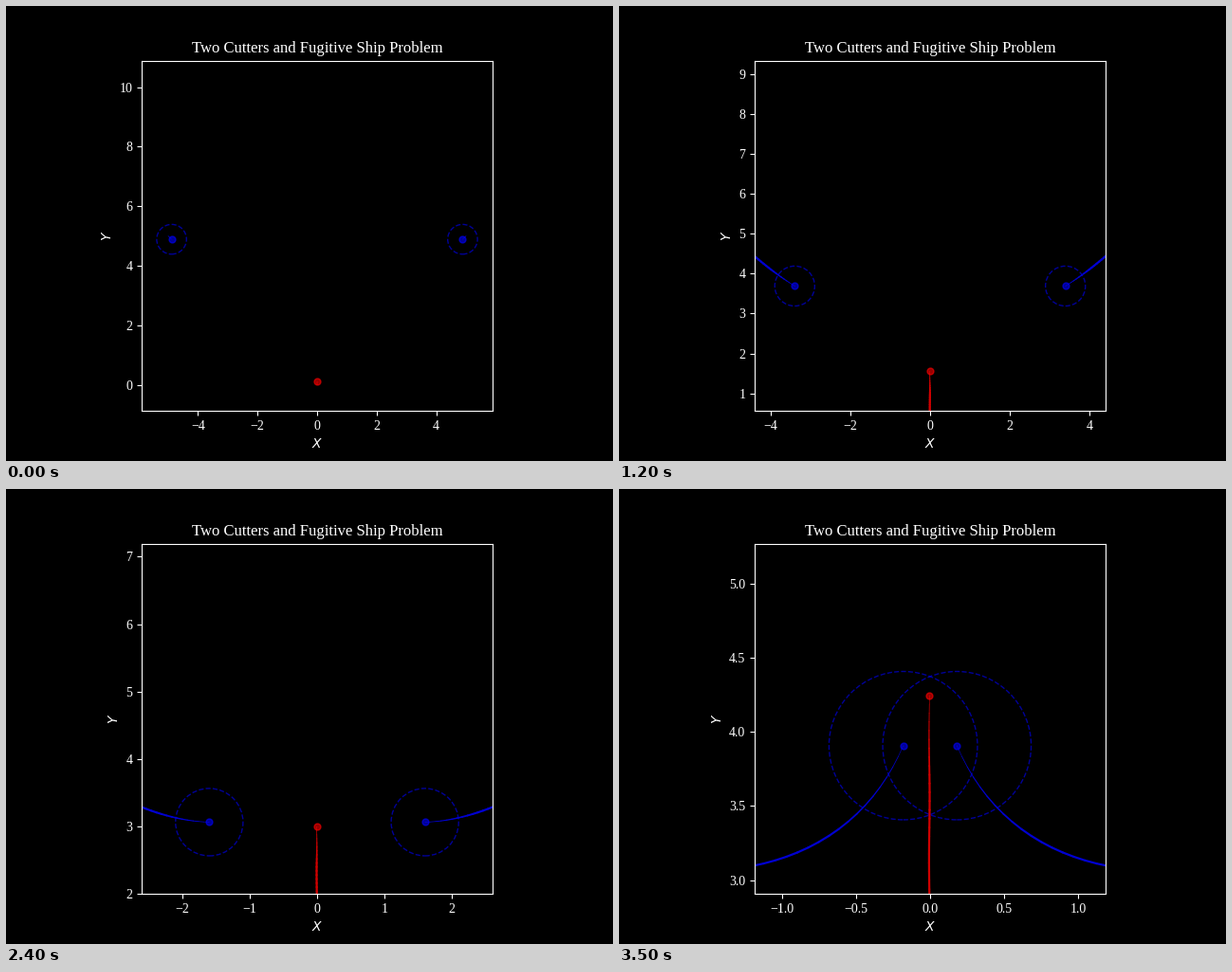
Recreate the animation shown at these times as a matplotlib script. Size 640 by 480 pixels, loop 8000 ms.

```python
import numpy as np
import matplotlib.pyplot as plt
from matplotlib.animation import FuncAnimation
from matplotlib.collections import LineCollection

plt.style.use("dark_background")
plt.rcParams["font.family"] = "Liberation Serif"
plt.rcParams["mathtext.fontset"] = "dejavusans"

FRAMES, INTERVAL = 160, 50
FIRST, LAST = 2, 72          # simulation steps shown
CAUGHT = 71                  # the fugitive stops here
V_CUTTER, V_SHIP = 0.08, 0.06
REACH, MARGIN = 0.5, 1.0
BLUE, RED = (0, 0, 0.82), (0.82, 0, 0)


def simulate():
    """Pure pursuit: each cutter heads for the ship's newest position."""
    n = np.arange(LAST + 1)
    ship_x = -0.005 * np.minimum(1, n / 10) + 0.002 * np.sin(0.45 * n)
    ship_y = V_SHIP * n - 0.0006 * np.maximum(0, n - 48)
    cutter = np.empty((LAST + 1, 2))
    cutter[0] = 5, 5
    for i in range(LAST):
        d = np.array([0, ship_y[i + 1]]) - cutter[i]
        cutter[i + 1] = cutter[i] + V_CUTTER * d / np.hypot(*d)
    return np.column_stack([ship_x, ship_y]), cutter


ship, right = simulate()
left = right * [-1, 1]

fig, ax = plt.subplots(figsize=(6.4, 4.8), dpi=100)
ax.set_aspect("equal")
ax.set_title("Two Cutters and Fugitive Ship Problem")
ax.set_xlabel("$X$")
ax.set_ylabel("$Y$")


class Boat:
    def __init__(self, path, trail_color, color, reach=None):
        self.path = path
        self.trail = LineCollection([], colors=[trail_color], capstyle="round")
        ax.add_collection(self.trail, autolim=False)
        self.ring = None
        if reach:
            self.ring = plt.Circle(path[0], reach, fill=False, ec=color,
                                   ls="--", lw=1, alpha=0.6)
            ax.add_patch(self.ring)
        self.dot, = ax.plot([], [], "o", color=color, ms=5, alpha=0.6, zorder=3)

    def move(self, n):
        pts = self.path[:n + 1]
        age = np.arange(n, 0, -1)
        self.trail.set_segments(np.stack([pts[:-1], pts[1:]], axis=1))
        self.trail.set_linewidths(np.minimum(1.6, 0.25 + 0.13 * age))
        self.dot.set_data(pts[-1:, 0], pts[-1:, 1])
        if self.ring:
            self.ring.center = pts[-1]


cutters = [Boat(p, BLUE, "blue", REACH) for p in (left, right)]
fugitive = Boat(ship, RED, "red")


def update(frame):
    n = min(FIRST + frame, LAST)
    m = min(n, CAUGHT)
    for c in cutters:
        c.move(n)
    fugitive.move(m)
    half = right[n, 0] + MARGIN
    bottom = min(right[n, 1], ship[m, 1]) - MARGIN
    ax.set_xlim(-half, half)
    ax.set_ylim(bottom, bottom + 2 * half)
    return []


anim = FuncAnimation(fig, update, frames=FRAMES, interval=INTERVAL,
                     repeat=True, repeat_delay=0, blit=False)
plt.show()
```
